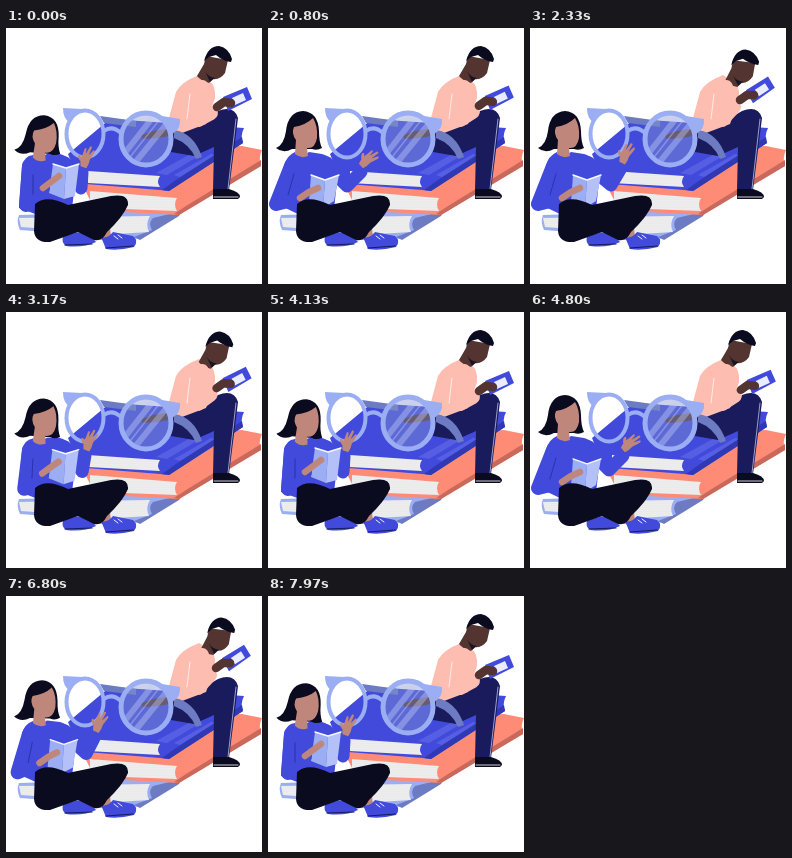
An HTML page for the animation above (8.01 s loop, 256 px wide and 256 px high).

```html
<!DOCTYPE html>
<html lang="en">
<meta charset="utf-8">
<title>Two readers</title>
<style>
  html, body { margin: 0; width: 100%; height: 100%; overflow: hidden; background: #fff }
  svg { display: block; width: 100vw; height: 100vh }
  .line { fill: none; stroke-linecap: round; stroke-linejoin: round }
  .blue { fill: #414adb } .pale { fill: #9baef3 } .slate { fill: #6c7bc2 }
  .coral { fill: #fd8b75 } .rust { fill: #c9695c } .peach { fill: #fdbdb0 }
  .navy { fill: #191b5c } .ink { fill: #0b0b20 } .tan { fill: #bf877b }
  .brown { fill: #533430 } .page { fill: url(#dots) }
</style>
<svg viewBox="0 0 256 256">
  <defs>
    <pattern id="dots" width="2" height="2" patternUnits="userSpaceOnUse">
      <path d="M0 0H2V2H0Z" fill="#f8f8f8"/>
      <circle cx="1" cy="1" r=".55" fill="#c0c0c4"/>
    </pattern>
    <clipPath id="lens"><ellipse cx="140" cy="111" rx="23" ry="24"/></clipPath>
    <path id="hand" d="M-4 3Q-6-4-4-9L-3-15Q-2-17-1-15L-1-10L2-18Q4-19 4-17L2-9L6-15Q8-15 7-12L4-5Q4 0 2 4ZM-4-1Q-9-5-8-8Q-6-9-5-6L-2-3Z"/>
  </defs>

  <!-- books, bottom to top -->
  <path class="pale" d="M13 187L150 183L172 186L134 211L110 209L14 202Q10 194 13 187Z"/>
  <path class="slate" d="M147 190L176 183L173 188L134 212L128 209L146 202Q142 195 147 190Z"/>
  <path class="page" d="M13 190L144 188Q139 196 143 204L110 206L15 199Z"/>
  <path class="coral" d="M76 156L110 124L236 118L256 122Q252 130 255 138L173 187L118 184L84 172Z"/>
  <path class="rust" d="M180 178L255 132L255 138L173 187L168 186Z"/>
  <path class="page" d="M84 163L171 170Q167 176 171 183L118 181L84 172Z"/>
  <path class="blue" d="M62 126L104 91L238 100Q234 108 237 115L163 163L154 162L80 156L66 136Z"/>
  <path fill="#3039b4" d="M170 152L236 109L237 115L163 163L156 162Z"/>
  <path d="M150 145L190 123L196 126L161 147ZM168 147L205 126L209 127L174 149Z" fill="#6f79ea" opacity=".45"/>
  <path class="page" d="M82 143L154 148Q150 154 154 159L82 155Z"/>

  <!-- man -->
  <path class="brown" d="M166 100L147 103L136 107Q134 110 138 111L152 110L169 107Z"/>
  <path class="navy" d="M164 111Q166 104 178 103L212 83Q228 77 232 90L223 162L207 163L208 119L188 128L165 124Z"/>
  <path class="line" d="M230 91L222 161" stroke="#a9aed6" stroke-width=".9"/>
  <path class="ink" d="M207 161L223 161Q234 164 234 169L232 171L207 171Z"/>
  <path class="line" d="M208 169L232 169" stroke="#fff" stroke-width=".8"/>
  <path class="peach" d="M193 47Q175 54 170 64L160 101L176 105L200 96L209 70Q210 57 203 53Z"/>
  <g id="manHead">
    <path class="brown" d="M200 28L222 32L219 45Q214 52 207 51L203 55Q195 53 191 48L198 36Z"/>
    <path class="ink" d="M199 43Q202 49 209 50L204 54Z" opacity=".8"/>
    <path class="ink" d="M198 33Q202 18 213 18Q223 20 226 31L225 34Q217 33 210 27L203 29Z"/>
  </g>
  <g id="tablet">
    <path class="blue" d="M-14-2L10-12L15 0L-9 12Z"/>
    <path d="M-5-1L6-6L9 1L-2 6Z" fill="#e9edff"/>
  </g>
  <path id="manArm" class="line" stroke="#fdbdb0" stroke-width="14"/>
  <path id="manHand" class="line" stroke="#533430" stroke-width="8.5"/>
  <path class="line" d="M184 66L181 91" stroke="#fff" stroke-width=".7"/>

  <!-- glasses -->
  <path class="slate" d="M94 88L130 93L130 99L98 95ZM168 102Q188 105 196 129L190 131Q184 116 168 110Z"/>
  <ellipse cx="140" cy="111" rx="25" ry="26" fill="#8494cd" fill-opacity=".42"/>
  <g clip-path="url(#lens)" stroke="#c4cdf8" opacity=".4">
    <path d="M118 126L151 84M128 136L167 88" stroke-width="6"/>
    <path d="M121 133L158 86" stroke-width="1.5"/>
  </g>
  <g class="line" stroke="#9baef3">
    <ellipse cx="79" cy="106" rx="18.5" ry="23.5" stroke-width="4"/>
    <ellipse cx="140" cy="111" rx="25" ry="26" stroke-width="5"/>
    <path d="M98 103Q106 97 115 105" stroke-width="4"/>
  </g>
  <path class="pale" d="M57 80L76 81L63 94Q57 90 57 80ZM150 87L174 91Q175 101 166 106Z"/>

  <!-- woman -->
  <path id="torso" class="blue"/>
  <g id="womanHead">
    <path class="ink" d="M8 120Q16 117 18 103Q20 84 35 83Q50 84 51 103Q51 114 54 120Q49 123 44 121L24 121Q15 126 8 120Z"/>
    <path class="tan" d="M26 99Q38 97 45 90Q50 98 49 110Q47 121 39 120L40 128Q33 131 27 126L28 112Q23 105 26 99Z"/>
  </g>
  <path id="farArm" class="line" stroke="#414adb" stroke-width="13"/>
  <use id="freeHand" href="#hand" class="tan"/>
  <path id="coverL" class="pale"/>
  <path id="coverR" fill="#b3c1f8"/>
  <path id="pages" class="line" stroke="#f8f9ff" stroke-width="1.4"/>
  <path id="nearArm" class="line" stroke="#414adb" stroke-width="14"/>
  <path id="armFold" class="line" stroke="#252e9c" stroke-width=".8"/>
  <path id="nearHand" class="line" stroke="#bf877b" stroke-width="6.5"/>
  <path class="tan" d="M92 203L104 199L105 211L94 212Z"/>
  <path class="blue" d="M57 209Q69 203 82 205L90 214Q78 220 60 218Q55 214 57 209ZM95 209Q102 211 107 204L127 208Q133 213 128 219Q112 223 100 221Z"/>
  <path class="line" d="M59 217L86 216M100 220L127 218" stroke="#191b5c" stroke-width="1.2"/>
  <path class="line" d="M108 208L112 211M112 207L116 210" stroke="#edf0ff" stroke-width="1"/>
  <path class="ink" d="M29 176Q40 166 62 177L105 168Q123 165 122 177Q117 189 101 204Q96 214 88 212L72 204L44 214Q29 215 28 203Z"/>
</svg>
<script>
  const CYCLE = 4005;
  const el = id => document.getElementById(id);
  const set = (id, d) => el(id).setAttribute('d', d);
  const turn = (id, value) => el(id).setAttribute('transform', value);
  const poly = (...p) => 'M' + p.join('L');
  const mix = (a, b, k) => a.map((v, i) => v + (b[i] - v) * k);

  // Each key is [time, ...values]; values ease between keys.
  function pose(t, ...keys) {
    let a = keys[0], b = a;
    for (const key of keys) {
      b = key;
      if (t < key[0]) break;
      a = key;
    }
    const k = a === b || t < a[0] ? 0 : (t - a[0]) / (b[0] - a[0]);
    return mix(a, b, k * k * (3 - 2 * k)).slice(1);
  }

  function drawWoman(t) {
    const [w] = pose(t, [180, 0], [820, 1], [2450, 1], [3400, 0]);
    const at = (a, b) => mix(a, b, w);
    turn('womanHead', `translate(0 ${4 - 4 * w}) rotate(${5 - 5 * w} 34 123)`);
    const back = at([13, 180], [9, 176]);
    set('torso', `M27 ${127 - 3 * w}Q18 128 16 138L${back}L32 187L66 181L70 145Q66 129 54 126L41 ${126 - 2 * w}Q34 131 27 ${127 - 3 * w}Z`);

    const [ex, ey, hx, hy, angle] = pose(t,
      [180, 75, 160, 79, 136, 10], [820, 79, 158, 96, 136, 40],
      [1450, 81, 157, 94, 132, 16], [2600, 81, 157, 94, 132, 16], [3400, 75, 160, 79, 136, 10]);
    set('farArm', `M59 135Q66 145 ${ex} ${ey}L${hx - 3} ${hy + 8}`);
    turn('freeHand', `translate(${hx} ${hy}) rotate(${angle})`);

    const lt = at([47, 136], [43, 147]), st = at([60, 140], [57, 152]), rt = at([73, 136], [71, 147]);
    const rb = at([69, 168], [66, 173]), sb = at([58, 171], [55, 180]), lb = at([43, 165], [41, 174]);
    set('coverL', poly(lt, st, sb, lb) + 'Z');
    set('coverR', poly(st, rt, rb, sb) + 'Z');
    set('pages', poly(lt, st, rt));

    const elbow = at([20, 177], [8, 176]), wrist = at([37, 160], [32, 170]);
    const palm = at([45, 154], [41, 164]), tip = at([53, 148], [50, 160]);
    set('nearArm', poly([23, 138], elbow, wrist));
    set('armFold', poly(at([27, 147], [26, 146]), at([27, 166], [20, 167])));
    set('nearHand', poly(wrist, palm, tip));
  }

  function drawMan(t) {
    const [m] = pose(t, [780, 0], [1450, 1], [2750, 1], [3500, 0]);
    const [x, y, angle] = pose(t,
      [620, 231, 71, 0], [1400, 230, 62, -9], [2750, 230, 62, -9], [3500, 231, 71, 0]);
    turn('manHead', `translate(${4 * m} ${4 * m}) rotate(${-3 * m} 204 47)`);
    turn('tablet', `translate(${x} ${y}) rotate(${angle})`);
    const wrist = [x - 20, y + 8 + 2 * m];
    set('manArm', poly([196, 59], [192, 92], [x - 26, y + 14 + 3 * m]));
    set('manHand', poly(wrist, [x - 13, y + 3 + 2 * m], [x - 6, y + 4 + m]));
  }

  function frame(now) {
    const t = now % CYCLE;
    drawWoman(t);
    drawMan(t);
    requestAnimationFrame(frame);
  }
  frame(0);
</script>
</html>
```
